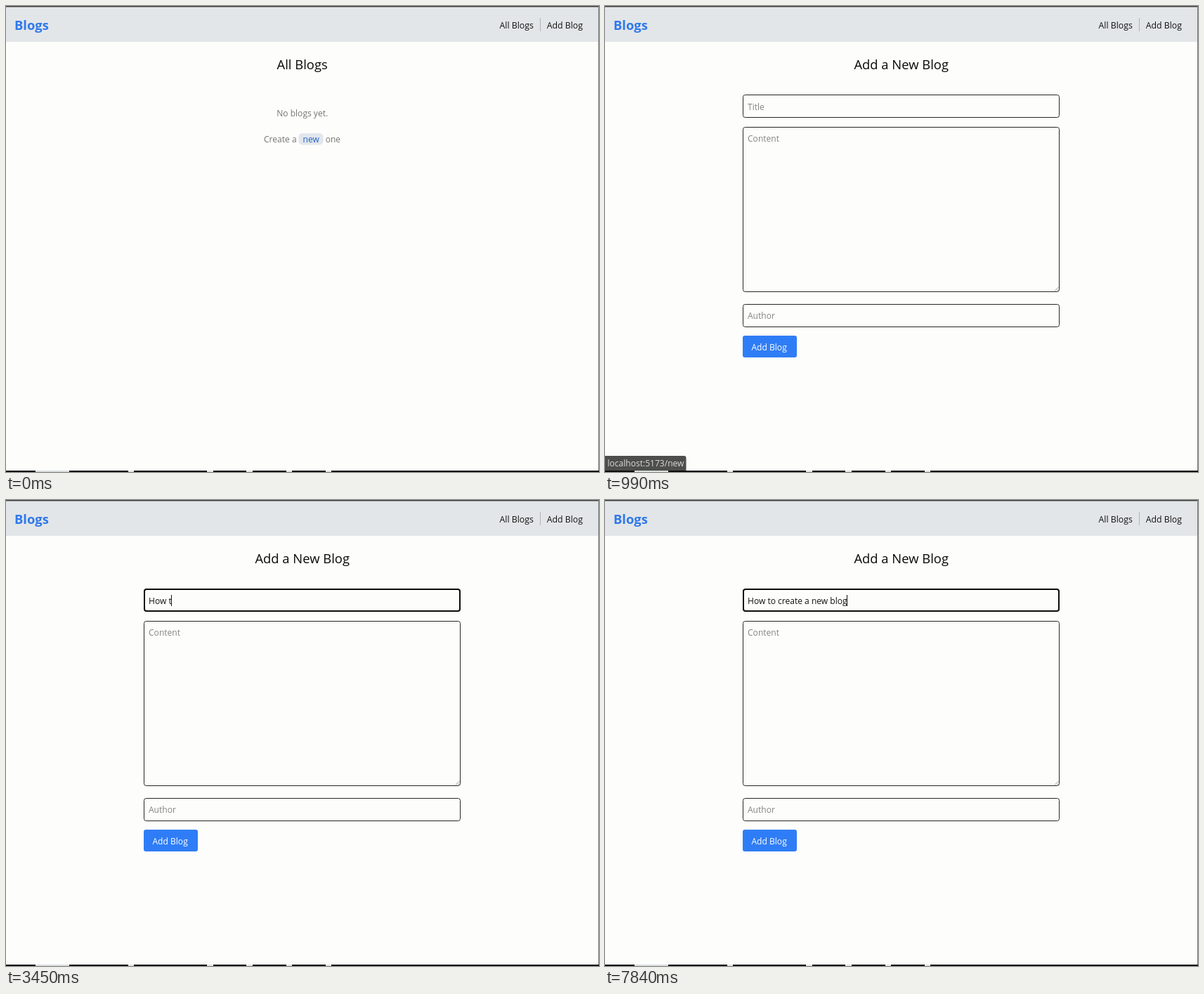
An HTML page that plays this animation: 844 px wide and 663 px high, repeating every 8000 ms.

```html
<!DOCTYPE html>
<html lang="en">
<head>
<meta charset="utf-8">
<title>Blogs</title>
<style>
  html, body { margin: 0; width: 100%; height: 100%; overflow: hidden; background: #fdfdfc; }
  svg { display: block; width: 844px; height: 663px; }
  text { font: 12.05px "Open Sans", "Noto Sans", sans-serif; fill: #111; white-space: pre; }
  .nav { font-size: 12.3px; }
  .heading { font-size: 18.4px; fill: #0a0a0a; }
  .brand { font-size: 18.4px; font-weight: 700; fill: #3079ea; }
  .muted { fill: #747474; }
  .hint { fill: #86847f; }
  .field { fill: none; stroke: #262626; }
</style>
</head>
<body>
<svg viewBox="0 0 844 663">
  <rect width="844" height="663" fill="#fdfdfc"/>
  <rect width="844" height="51" fill="#e3e6e8"/>
  <rect width="844" height="1.5" fill="#3c3e3c"/>
  <rect x="843" width="1" height="663" fill="#777"/>
  <text class="brand" x="12" y="34">Blogs</text>
  <text class="nav" x="702.5" y="31.5">All Blogs</text>
  <rect x="760" y="17" width="1" height="19" fill="#b2b5b7"/>
  <text class="nav" x="769.7" y="31.5">Add Blog</text>

  <g id="listPage">
    <text class="heading" x="421.7" y="90" text-anchor="middle">All Blogs</text>
    <text class="muted" x="421.7" y="157" text-anchor="middle">No blogs yet.</text>
    <text class="muted" x="367" y="194">Create a</text>
    <rect x="416.5" y="181" width="35" height="16.5" rx="5" fill="#e1e7ec"/>
    <text x="422.5" y="194" style="fill:#2560c4">new</text>
    <text class="muted" x="454.7" y="194">one</text>
  </g>

  <g id="formPage">
    <text class="heading" x="421.7" y="90" text-anchor="middle">Add a New Blog</text>
    <rect id="titleField" class="field" rx="3"/>
    <text id="titleHint" class="hint" x="203" y="148">Title</text>
    <text id="titleText" x="203" y="148"></text>
    <path id="squiggle" fill="none" stroke="#e33" stroke-width="1"/>
    <rect id="caret" y="135" width="1" height="16" fill="#111"/>
    <rect class="field" x="196.5" y="172.5" width="450" height="234" rx="3"/>
    <path d="M640 405.5l5.5-5.5M643.5 405.5l2-2" stroke="#777" stroke-width=".8"/>
    <text class="hint" x="203" y="193">Content</text>
    <rect class="field" x="196.5" y="424.5" width="450" height="32" rx="3"/>
    <text class="hint" x="203" y="445">Author</text>
    <rect x="196" y="469" width="77" height="31" rx="3" fill="#2f7df6"/>
    <text x="208.5" y="489.5" style="fill:#fff">Add Blog</text>
  </g>

  <g id="status">
    <path d="M0 640H112.5q3 0 3 3V663H0z" fill="#1c1c1c"/>
    <text x="3.5" y="655" style="fill:#d2d2d2">localhost:5173/new</text>
  </g>
  <path d="M0 662H844" stroke="#0c0c0c" stroke-width="2"/>
  <path d="M42 662h48" stroke="#d9dcdc" stroke-width="2"/>
  <path d="M174 662h8M286 662h9M342 662h9M399 662h8M455 662h8" stroke="#e4e4e2" stroke-width="2"/>
</svg>
<script>
const LOOP = 8000, TEXT_X = 203;
const OPEN_FORM = 720, FOCUS = 1530, CARET_OFF = 2120, TYPING = 2720;

// Each key press: time and characters; "<" deletes the last one.
const KEYS = [
  [2720, "H"], [2970, "o"], [3090, "w"], [3210, " "], [3450, "t"], [3650, "o"],
  [3820, " c"], [4260, "r"], [4440, "e"], [4650, "a"], [4740, "t"], [4920, " "],
  [5180, "<"], [5340, "e"], [5510, " "], [5750, "a"], [5850, " "],
  [6230, "n"], [6320, "e"], [6590, " "], [6940, "<"], [7030, "w"], [7120, " "],
  [7380, "b"], [7600, "lo"], [7790, "g"]
];
// Spelling marks under unfinished words.
const MARKS = [
  { from: 4950, to: 5180, before: "How to ", word: "creat" },
  { from: 6620, to: 6940, before: "How to create a ", word: "ne" }
];

const $ = id => document.getElementById(id);
const [listPage, formPage, titleField, titleHint, titleText, squiggle, caret, status_] =
  ["listPage", "formPage", "titleField", "titleHint", "titleText", "squiggle", "caret", "status"].map($);
const show = (el, on) => el.setAttribute("visibility", on ? "visible" : "hidden");
const setAll = (el, attrs) => Object.entries(attrs).forEach(([k, v]) => el.setAttribute(k, v));
const ramp = (t, a, b) => Math.min(1, Math.max(0, (t - a) / (b - a)));

function typedAt(t) {
  let text = "";
  for (const [time, chars] of KEYS) {
    if (time > t) break;
    text = chars === "<" ? text.slice(0, -1) : text + chars;
  }
  return text;
}

function widthOf(text) {
  titleText.textContent = text;
  return text ? titleText.getComputedTextLength() : 0;
}

function wave(x, width) {
  let d = `M${x} 152.5`;
  for (let i = 1; i * 2 <= width; i++) d += `L${x + i * 2} ${i % 2 ? 151 : 153}`;
  return d;
}

function render(t) {
  const form = t >= OPEN_FORM, focused = t >= FOCUS;
  show(listPage, !form);
  formPage.setAttribute("display", form ? "inline" : "none");

  setAll(titleField, focused
    ? { x: 197, y: 127, width: 449, height: 31, "stroke-width": 2, style: "stroke:#0c0c0c" }
    : { x: 196.5, y: 126.5, width: 450, height: 32, "stroke-width": 1, style: "" });

  const mark = MARKS.find(m => t >= m.from && t < m.to);
  show(squiggle, form && mark);
  if (mark) {
    const start = widthOf(mark.before);
    squiggle.setAttribute("d", wave(TEXT_X + start, widthOf(mark.before + mark.word) - start));
  }

  const text = typedAt(t);
  caret.setAttribute("x", Math.round(TEXT_X + widthOf(text) - 0.5));
  show(titleHint, form && !text);
  show(caret, focused && (t < CARET_OFF || t >= TYPING));

  status_.setAttribute("opacity", ramp(t, 360, 500) * (1 - ramp(t, 945, 1150)));
}

function tick(now) {
  render(now % LOOP);
  requestAnimationFrame(tick);
}
render(0);
requestAnimationFrame(tick);
</script>
</body>
</html>
```
